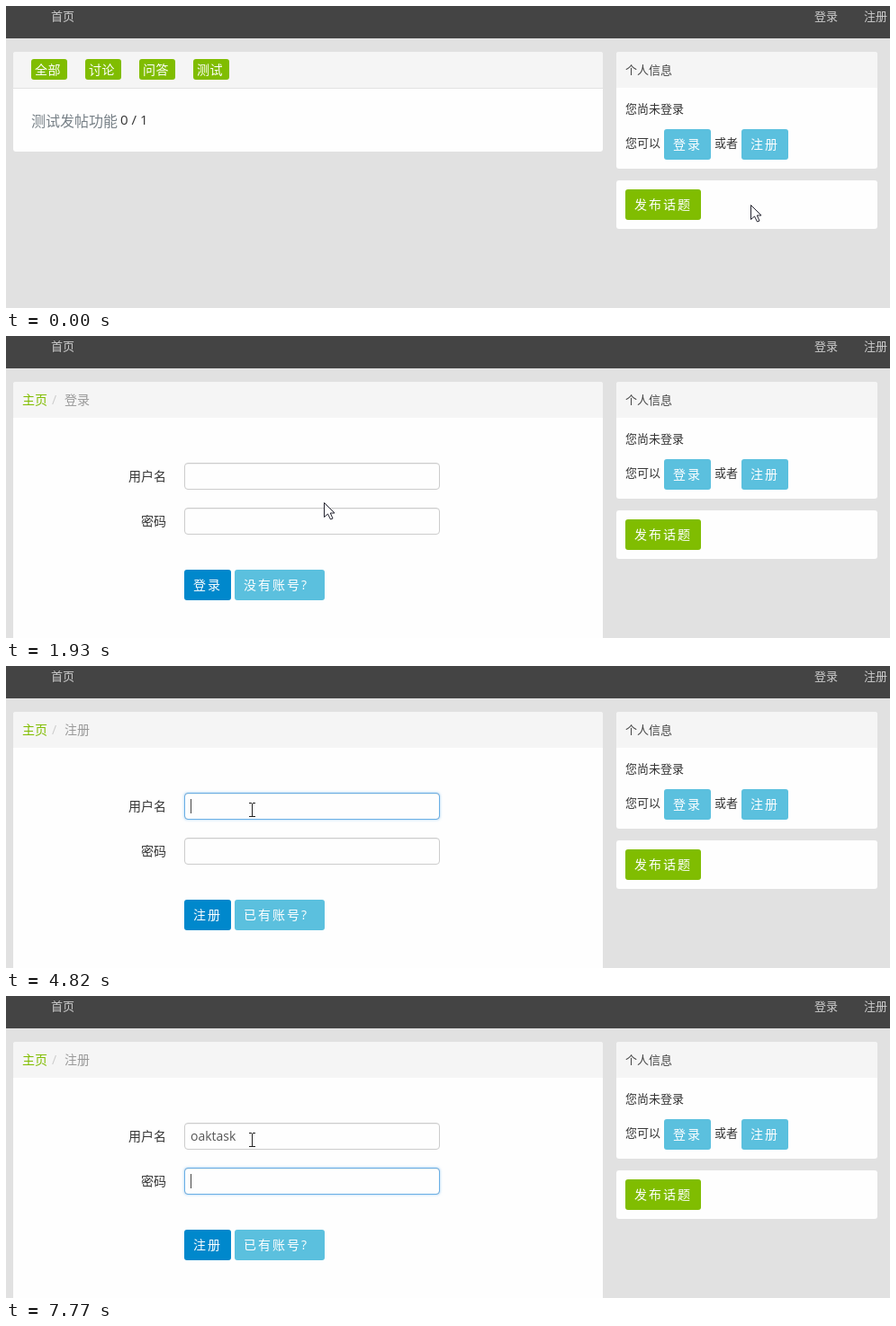
These frames come from a looping animation (982x336 px, 8000 ms). An HTML page with a canvas:

```html
<!DOCTYPE html>
<html lang="zh">
<head>
<meta charset="utf-8">
<style>
  html, body { margin: 0; width: 100%; height: 100%; overflow: hidden; background: #e1e1e1; }
  canvas { display: block; }
</style>
</head>
<body>
<canvas id="stage" width="982" height="336"></canvas>
<script>
const ctx = document.getElementById('stage').getContext('2d');
const LOOP = 8000, STEP = 90;
const SANS = '"Open Sans", "Noto Sans CJK SC", "Noto Sans CJK", sans-serif';
const BOLD = '"Liberation Sans", sans-serif';
const MONO = '"Noto Sans Mono", monospace';
const GREEN = '#80bd01', INFO = '#5bc0de', PRIMARY = '#0088cc';
const HOVER = { [GREEN]: '#6ba44e', [INFO]: '#2f96b4', [PRIMARY]: '#005580' };
const LOGIN_PAGE = 1570, REGISTER_PAGE = 3740;

// Pointer path: time, x, y. It is sampled every STEP from the start of each move.
const path = [
  [190, 827, 221], [640, 756, 224], [1390, 756, 224], [1480, 754, 220], [1570, 740, 218],
  [1930, 353, 185], [2200, 300, 156], [2650, 300, 156], [2920, 232, 250], [3100, 238, 307],
  [3460, 306, 285], [3650, 306, 285], [3920, 257, 182], [4280, 273, 164], [4640, 273, 164],
  [4820, 273, 160],
];
const moves = [280, 1480, 2740, 3740, 4730];

// Input method window: time, typed letters, candidates.
const typing = [
  [0, ''],
  [5000, 'o', '哦 欧洲人 偶然间 偶像剧 O型'],
  [5370, "o'a", '偶 偶爱 哦啊 欧安 藕暗'],
  [5740, 'oak', 'OAK 偶爱 哦啊 欧安 藕暗'],
  [6020, ''],
  [6480, 't', '他 她 它 太 天'],
  [6570, 'ta', '他 她 它 塔 踏'],
  [6850, 'tas', '他说 她说 踏碎 他 她'],
  [7130, 'task', '他上课 她看 踏上 塔山 他说'],
  [7310, ''],
];

const clamp = (v, lo, hi) => Math.min(hi, Math.max(lo, v));
const latest = (list, t) => list.findLast(item => item[0] <= t);
const ramp = (t, start, steps) => clamp(Math.floor((t - start) / STEP) + 1, 0, steps) / steps;

let pointer = { x: 0, y: 0 };
const isOver = (x, y, w, h) =>
  pointer.x >= x && pointer.x < x + w && pointer.y >= y && pointer.y < y + h;

function pointerAt(t) {
  const start = moves.findLast(m => m <= t) ?? 0;
  const time = start + Math.floor((t - start) / STEP) * STEP;
  const i = path.findLastIndex(p => p[0] <= time);
  if (i < 0 || !start) return { x: path[0][1], y: path[0][2] };
  const a = path[i], b = path[i + 1] ?? a;
  const k = a === b ? 0 : (time - a[0]) / (b[0] - a[0]);
  return { x: Math.round(a[1] + (b[1] - a[1]) * k), y: Math.round(a[2] + (b[2] - a[2]) * k) };
}

function rect(x, y, w, h, color, radius = 0) {
  ctx.fillStyle = color;
  ctx.beginPath();
  ctx.roundRect(x, y, w, h, radius);
  ctx.fill();
}

// Text placed by its left edge and vertical middle; returns its width.
function text(str, x, middle, size, color, spacing = 0, family = SANS) {
  ctx.font = `${family === BOLD ? 'bold ' : ''}${size}px ${family}`;
  ctx.letterSpacing = spacing + 'px';
  ctx.fillStyle = color;
  ctx.fillText(str, x, Math.round(middle + size * 0.38));
  return ctx.measureText(str).width;
}

function button(label, x, y, color) {
  const w = label.length * 16 + 20, h = 34;
  rect(x, y, w, h, isOver(x, y, w, h) ? HOVER[color] : color, 3);
  text(label, x + 10, y + h / 2, 14, '#fff', 2);
}

function panel(x, y, w, h, hasHead) {
  rect(x, y, w, h, '#fefefe', 3);
  if (hasHead) rect(x, y, w, 40, '#f5f5f5', [3, 3, 0, 0]);
}

function field(y, focus) {
  ctx.save();
  ctx.shadowColor = `rgba(82, 168, 236, ${0.6 * focus})`;
  ctx.shadowBlur = 3;
  rect(198, y, 284, 30, '#fefefe', 4);
  ctx.restore();
  rect(200, y + 1, 280, 1, '#f0f0f0');
  ctx.beginPath();
  ctx.roundRect(198.5, y + 0.5, 283, 29, 3.5);
  ctx.strokeStyle = '#ccc';
  ctx.stroke();
  ctx.strokeStyle = `rgba(82, 168, 236, ${0.8 * focus})`;
  ctx.stroke();
}

const caret = (x, y, color = '#444') => rect(x, y, 1, 16, color);

function drawHome() {
  panel(8, 51, 655, 111, true);
  rect(8, 91, 655, 1, '#e2e2e2');
  ['全部', '讨论', '问答', '测试'].forEach((label, i) => {
    rect(28 + i * 60, 59, 40, 23, GREEN, 3);
    text(label, 32 + i * 60, 71, 14, '#fff', 0.5);
  });
  text('测试发帖功能', 28, 127.5, 16, '#778087');
  text('0 / 1', 127, 126, 15, '#333');
}

function drawForm(t, action, question) {
  panel(8, 51, 655, 300, true);
  text('主页', 18, 71, 14, GREEN);
  text('/', 51, 71, 14, '#ccc');
  text(action, 65, 71, 14, '#999');
  text('用户名', 136, 156, 14, '#333');
  text('密码', 150, 206, 14, '#333');

  const passFocus = ramp(t, 7590, 3);
  const userFocus = t < REGISTER_PAGE ? ramp(t, 2380, 2) : ramp(t, 4370, 2) - passFocus;
  field(141, userFocus);
  field(191, passFocus);
  button(action, 198, 260, PRIMARY);
  button(question, 254, 260, INFO);

  const user = t >= 7310 ? 'oaktask' : t >= 6020 ? 'oak' : '';
  const end = 205 + Math.round(text(user, 205, 156, 14, '#555'));
  const [, letters, candidates] = latest(typing, t);
  if (passFocus) caret(205, 198);
  else if (letters) {
    rect(end + 1, 162, 2, 1, '#555');
    caret(end + 4, 148);
    drawInputMethod(end + 3, letters, candidates.split(' '));
  } else if (t >= 4820) caret(end, 148);
}

function drawInputMethod(left, letters, candidates) {
  const charWidth = c => c < '\u0100' ? 8 : 16;
  const items = candidates.map((word, i) => [...`${i + 1}.${word}`]);
  const total = items.flat().reduce((sum, c) => sum + charWidth(c), 0) + 13 * 4;
  const width = total + 85, x0 = left + 11, nav = x0 + total + 13;

  rect(left, 168, width, 56, '#a8c3d6');
  rect(left + 1, 169, width - 2, 54, '#fff');
  rect(x0, 195, nav + 28 - x0, 1, '#cfdfe9');
  const lettersWidth = text(letters, x0, 182, 16, '#0a61bd', 0, BOLD);
  caret(x0 + Math.ceil(lettersWidth), 174, '#d22');

  let x = x0;
  items.forEach((chars, i) => {
    const color = i ? '#0a80d0' : '#d01010';
    for (const c of chars) {
      const w = charWidth(c);
      if (w === 8) text(c, x, 210, 13.33, color, 0, MONO);
      else text(c, x, 209, 16, color);
      x += w;
    }
    x += 13;
  });

  for (const [dx, dir, color] of [[0, -1, '#a9cbe2'], [14, 1, '#1587d2']]) {
    rect(nav + dx, 203, 14, 14, '#bddcf0');
    rect(nav + dx + 1, 204, 12, 12, '#f4faff');
    const cx = nav + dx + 7;
    ctx.fillStyle = color;
    ctx.beginPath();
    ctx.moveTo(cx - 2 * dir, 207);
    ctx.lineTo(cx + 2 * dir, 210);
    ctx.lineTo(cx - 2 * dir, 213);
    ctx.fill();
  }
  rect(left + width - 31, 170, 29, 28, '#f59a78');
}

function drawSidebar() {
  panel(678, 51, 290, 130, true);
  text('个人信息', 688, 71, 13, '#444');
  text('您尚未登录', 688, 114, 13, '#333');
  text('您可以', 688, 152, 13, '#333');
  button('登录', 731, 137, INFO);
  text('或者', 787, 152, 13, '#333');
  button('注册', 817, 137, INFO);
  panel(678, 194, 290, 54);
  button('发布话题', 688, 204, GREEN);
}

function drawPointer(overField) {
  const { x, y } = pointer;
  if (overField) {
    rect(x, y - 7, 1, 15, '#222');
    for (const edge of [y - 8, y + 7]) {
      rect(x - 3, edge, 3, 1, '#222');
      rect(x + 1, edge, 3, 1, '#222');
    }
    return;
  }
  ctx.save();
  ctx.translate(x + 0.5, y + 0.5);
  const arrow = new Path2D('M0 0V16L4 12.5L7 18.5L9.5 17.5L6.8 11.5H11.5Z');
  ctx.fillStyle = '#fff';
  ctx.strokeStyle = '#22222e';
  ctx.fill(arrow);
  ctx.stroke(arrow);
  ctx.restore();
}

function draw(t) {
  pointer = pointerAt(t);
  rect(0, 0, 982, 336, '#e1e1e1');
  rect(0, 0, 982, 36, '#444');
  text('首页', 50, 11, 13, '#ccc');
  text('登录', 898, 11, 13, '#ccc');
  text('注册', 953, 11, 13, '#ccc');
  drawSidebar();
  if (t < LOGIN_PAGE) drawHome();
  else if (t < REGISTER_PAGE) drawForm(t, '登录', '没有账号?');
  else drawForm(t, '注册', '已有账号?');
  drawPointer(t >= LOGIN_PAGE && (isOver(198, 141, 284, 30) || isOver(198, 191, 284, 30)));
}

function tick() {
  draw(performance.now() % LOOP);
  requestAnimationFrame(tick);
}
tick();
</script>
</body>
</html>
```
